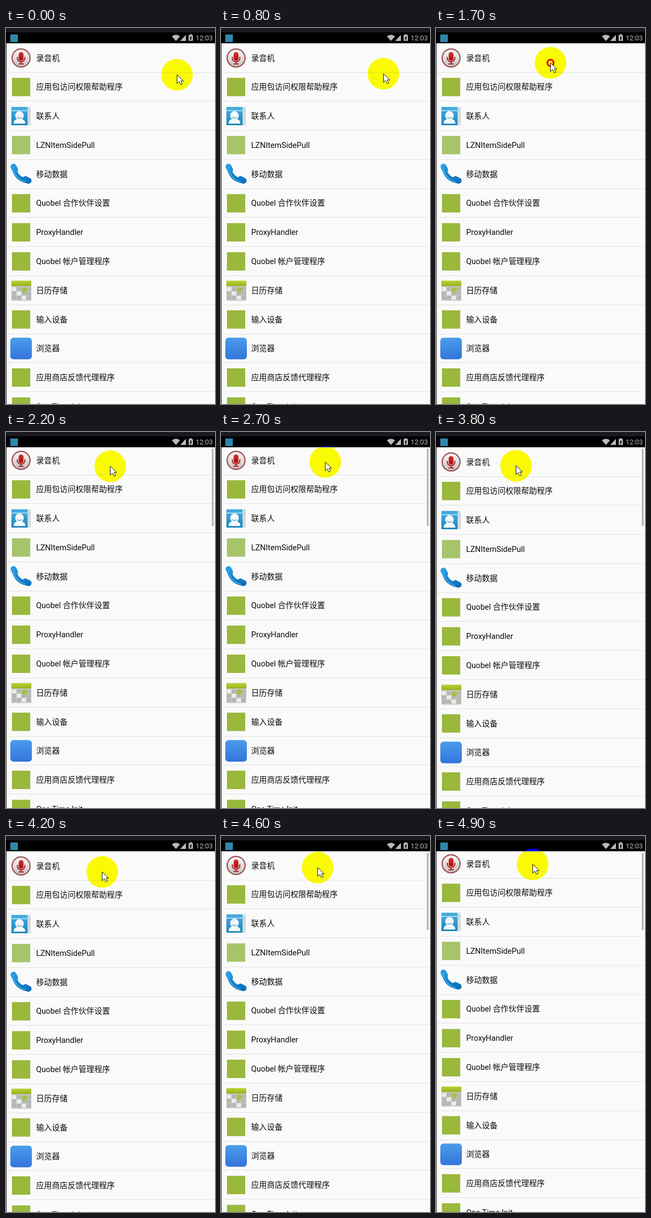
An HTML page with a canvas for the animation above (5000 ms loop, 388 by 696 pixels).

```html
<!DOCTYPE html>
<html lang="zh-CN">
<head>
<meta charset="utf-8">
<style>
html, body { margin: 0; width: 100%; height: 100%; overflow: hidden; background: #fafafa; }
canvas { display: block; }
</style>
</head>
<body>
<canvas id="stage" width="388" height="696"></canvas>
<script>
const c = document.getElementById('stage').getContext('2d');
const FONT = 'Roboto, "Noto Sans CJK SC", "Noto Sans CJK", sans-serif';
const LOOP = 5000, STEP = 100, PITCH = 53.78;

const labels = [
  '录音机', '应用包访问权限帮助程序', '联系人', 'LZNItemSidePull', '移动数据',
  'Quobel 合作伙伴设置', 'ProxyHandler', 'Quobel 帐户管理程序', '日历存储',
  '输入设备', '浏览器', '应用商店反馈代理程序', 'One Time Init'
];
const icons = {
  '录音机': mic, '联系人': contacts, 'LZNItemSidePull': paleApp,
  '移动数据': phone, '日历存储': calendar, '浏览器': browser
};

// Turning points of the pointer: time, x, y
const turns = [
  [0, 317, 86], [300, 269, 106], [600, 309, 98], [800, 301, 84],
  [1200, 305, 61], [1400, 305, 61], [1700, 212, 64], [2200, 193, 63],
  [2600, 191, 53], [3300, 228, 89], [3500, 258, 126], [3800, 148, 62],
  [4200, 178, 66], [4900, 179, 52]
];

function ease(t, from, to) {
  const k = Math.min(1, Math.max(0, (t - from) / (to - from)));
  return k * k * (3 - 2 * k);
}

function pointerAt(t) {
  let [, x, y] = turns[0];
  for (let i = 1; i < turns.length; i++) {
    const [t0, x0, y0] = turns[i - 1], [t1, x1, y1] = turns[i];
    const k = ease(t, t0, t1);
    x += (x1 - x0) * k;
    y += (y1 - y0) * k;
  }
  return [Math.round(x), Math.round(y)];
}

function scrollAt(t) {
  return Math.round(3 * (ease(t, 1800, 2200) - ease(t, 2700, 3100)) + 4 * ease(t, 4500, 4900));
}

function rect(x, y, w, h, color, r = 0) {
  c.fillStyle = color;
  c.beginPath();
  c.roundRect(x, y, w, h, r);
  c.fill();
}

function disc(x, y, r, color) {
  c.fillStyle = color;
  c.beginPath();
  c.arc(x, y, r, 0, 7);
  c.fill();
}

function fill(d, color) {
  c.fillStyle = color;
  c.fill(new Path2D(d));
}

function line(d, color, width) {
  c.strokeStyle = color;
  c.lineWidth = width;
  c.stroke(new Path2D(d));
}

function gradient(y0, y1, ...colors) {
  const g = c.createLinearGradient(0, y0, 0, y1);
  colors.forEach((color, i) => g.addColorStop(i / (colors.length - 1), color));
  return g;
}

// Icons are drawn around their own centre.
function app() { rect(-17, -17, 34, 34, '#99b83c'); }
function paleApp() { rect(-17, -17, 34, 34, '#a6c46a'); }
function browser() { rect(-20, -20, 40, 40, gradient(-20, 20, '#4a9cec', '#3474da'), 6); }

function mic() {
  disc(0, 0, 18, '#8c8c8c');
  disc(0, 0, 17, '#b93a3a');
  disc(0, 0, 15.5, gradient(-15, 15, '#fafafa', '#c4c4c4'));
  rect(-4.5, -11, 9, 16, gradient(-11, 5, '#d83030', '#a80d0d'), 4.5);
  line('M-7-2v2a7 7 0 0 0 14 0v-2M0 7v4M-5 11h10', '#b02020', 2);
}

function contacts() {
  rect(10, -17, 8, 34, '#d3dbe0', 1);
  rect(-18, -17, 30, 34, gradient(-17, 17, '#48aee0', '#1d86bd'), 1);
  rect(-18, -11, 36, 2, '#a5d9f0');
  fill('M-14 14q0-8 9-9h4q9 1 9 9z', '#f4f8fa');
  disc(-3, -1, 8, '#f4f8fa');
  line('M-7 2q4 4 8 0', '#58a8d4', 1.5);
}

function phone() {
  const blue = gradient(-19, 19, '#2ba2e8', '#0768b4');
  c.lineCap = 'round';
  line('M-13-11Q-9 9 12 13', blue, 8);
  line('M-14-14L-11-8M8 9L14 12', blue, 11);
  line('M-15-13Q-12 8 8 14', '#49b5ef', 1.5);
}

function calendar() {
  rect(-18, -18, 37, 37, '#c6c9c5', 1);
  rect(-18, -18, 37, 10, gradient(-18, -8, '#bcd235', '#98b11c'), 1);
  for (let i = 0; i < 12; i++) {
    const x = i % 4, y = i / 4 | 0;
    rect(-17 + 9 * x, -6 + 8 * y, 8, 7, (x * 3 + y * 2) % 5 ? '#b4b8b3' : '#ecedea');
  }
  disc(6, -1, 5, '#a8bf43');
}

function list(scroll) {
  c.save();
  c.beginPath();
  c.rect(1, 28, 387, 668);
  c.clip();
  c.translate(0, -scroll);
  c.font = '14.6px ' + FONT;
  labels.forEach((label, i) => {
    const y = 55.5 + i * PITCH;
    c.save();
    c.translate(28, y);
    (icons[label] || app)();
    c.restore();
    c.fillStyle = '#0b0b0b';
    c.fillText(label, 56, Math.round(y + 5));
    rect(1, Math.round(81.5 + i * PITCH), 387, 1, '#e2e2e2');
  });
  c.restore();
  rect(1, 28, 387, 2, gradient(28, 30, '#909090', '#fafafa00'));
}

function statusBar() {
  rect(0, 0, 388, 8, '#1a191f');
  rect(0, 8, 388, 20, '#000');
  rect(0, 28, 1, 668, '#202020');
  rect(8, 12, 14, 14, '#2f87ac');
  fill('M315.5 24L308 15.5q7.5-6 15 0zM323.5 24h10.5V12.5z', '#b9b9b9');
  rect(341, 11.5, 4, 2, '#b9b9b9');
  rect(339, 13, 8, 11, '#b9b9b9', 1);
  line('M344 15l-2 4h2l-2 4', '#000', 1.3);
  c.fillStyle = '#bdbdbd';
  c.font = '12.8px ' + FONT;
  c.fillText('12:03', 352, 23);
}

function pointer(x, y, pressed) {
  c.save();
  c.translate(x + .5, y + .5);
  c.globalCompositeOperation = 'difference';
  disc(0, 0, 29.3, '#00f');
  c.globalCompositeOperation = 'source-over';
  if (pressed) {
    disc(0, 0, 7.5, '#e3160c');
    disc(0, 0, 4, '#ff0');
  }
  const arrow = 'M0 0v16l4-3.5 3 6 3-1.5-3-5.5h5z';
  fill(arrow, '#fff');
  line(arrow, '#111', 1);
  c.restore();
}

function draw(now) {
  const t = Math.floor(now % LOOP / STEP) * STEP;
  rect(0, 0, 388, 696, '#fafafa');
  list(scrollAt(t));
  statusBar();
  if (t >= 1900 && t < 4000 || t >= 4600) rect(382, 31, 3.5, 143, '#b8b8b8');
  pointer(...pointerAt(t), t >= 1600 && t <= 1800);
}

const start = performance.now();
function tick() {
  draw(performance.now() - start);
  requestAnimationFrame(tick);
}
tick();
</script>
</body>
</html>
```
